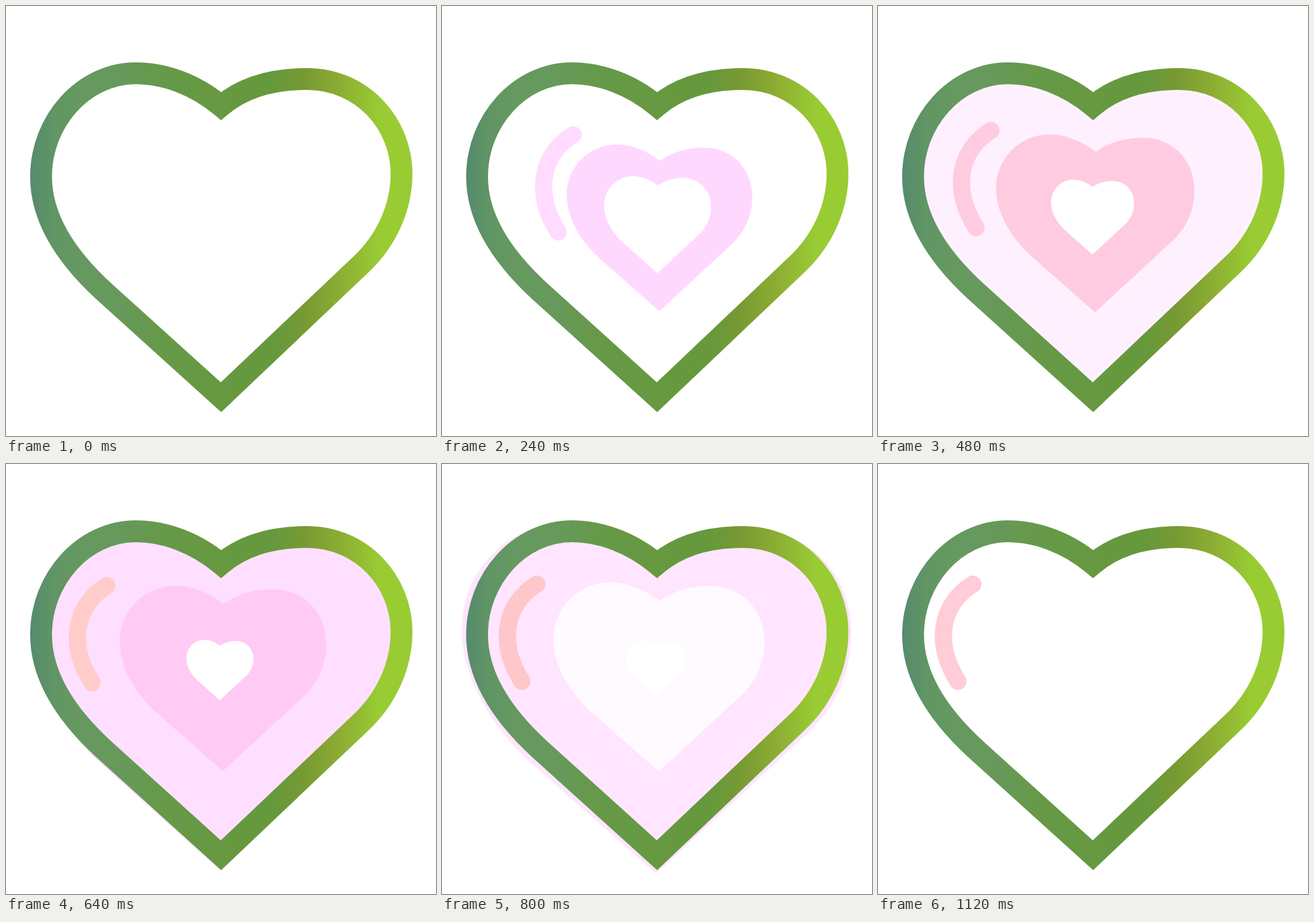
These frames come from a looping animation (748x748 px, 1200 ms). An HTML page:

```html
<!DOCTYPE html>
<html lang="en">
<head>
<meta charset="utf-8">
<title>Heart ripple</title>
<style>
html, body { margin: 0; width: 100%; height: 100%; overflow: hidden; background: #fff; }
svg { display: block; width: 100vw; height: 100vh; }

/* The picture advances every 80 ms: 15 poses per loop. */
.outer, .middle, .hole, .shine { animation: 1200ms linear infinite; }
.outer { animation-name: outer-grow, outer-tint; }
.middle { animation-name: middle-grow, middle-tint; }
.hole { animation-name: hole-shrink; fill: #fff; }
.shine { animation-name: shine-slide, shine-tint; fill: none; stroke-width: 30; stroke-linecap: round; }

@keyframes outer-grow {
  0% { transform: translate(100px, 160px) scale(1.471, 1.587); animation-timing-function: steps(11); }
  73.333%, 100% { transform: translate(28px, 97px) scale(1.883, 1.88); }
}
@keyframes outer-tint {
  0% { fill: #fff; }
  26.666% { fill: #fff; animation-timing-function: steps(2); }
  40% { fill: #fff0ff; animation-timing-function: steps(2); }
  53.333% { fill: #ffdfff; animation-timing-function: steps(1); }
  60% { fill: #ffd1ff; animation-timing-function: steps(2); }
  73.333% { fill: #fff8ff; animation-timing-function: steps(1); }
  80%, 100% { fill: #fff; }
}

@keyframes middle-grow {
  0% { transform: translate(228.5px, 258.5px) scale(.8195, .822); animation-timing-function: steps(9); }
  60%, 100% { transform: translate(194px, 206px) scale(1, 1); }
}
@keyframes middle-tint {
  0% { fill: #fff; animation-timing-function: steps(3); }
  20% { fill: #ffd8ff; animation-timing-function: steps(3); }
  40% { fill: #ffcbe0; animation-timing-function: steps(2); }
  53.333% { fill: #ffcbf4; animation-timing-function: steps(1); }
  60% { fill: #ffe8ff; animation-timing-function: steps(1); }
  66.666% { fill: #fffaff; animation-timing-function: steps(1); }
  73.333%, 100% { fill: #fff; }
}

@keyframes hole-shrink {
  0% { transform: translate(263px, 290px) scale(.62, .631); animation-timing-function: steps(9); }
  60%, 100% { transform: translate(320px, 308px) scale(.2807, .2796); }
}

@keyframes shine-slide {
  0% { transform: translate(94.5px, 22.5px); animation-timing-function: steps(9); }
  60%, 100% { transform: translate(0, 0); }
}
@keyframes shine-tint {
  0% { stroke: #fff; animation-timing-function: steps(3); }
  20% { stroke: #ffdcff; animation-timing-function: steps(3); }
  40% { stroke: #ffcbdf; animation-timing-function: steps(2); }
  53.333% { stroke: #ffccc9; animation-timing-function: steps(1); }
  60% { stroke: #ffc2c8; animation-timing-function: steps(2); }
  73.333% { stroke: #ffcbcb; animation-timing-function: steps(3); }
  93.333%, 100% { stroke: #ffccd7; }
}
</style>
</head>
<body>
<svg viewBox="0 0 748 748">
  <defs>
    <path id="heart" d="M184 32C159 13 130 0 99 0 44 0 0 44 0 100 0 144 26 189 64 224L183 329 326 197C353 172 367 139 367 103 367 49 328 6 271 6 238 6 208 15 184 32Z"/>
    <linearGradient id="leaf" gradientUnits="userSpaceOnUse" x1="42" y1="0" x2="707" y2="0">
      <stop offset="0" stop-color="#568b6d"/>
      <stop offset=".06" stop-color="#609565"/>
      <stop offset=".13" stop-color="#669960"/>
      <stop offset=".24" stop-color="#66995a"/>
      <stop offset=".35" stop-color="#669948"/>
      <stop offset=".5" stop-color="#669940"/>
      <stop offset=".64" stop-color="#66993c"/>
      <stop offset=".715" stop-color="#779933"/>
      <stop offset=".81" stop-color="#8cad33"/>
      <stop offset=".915" stop-color="#99cc33"/>
    </linearGradient>
  </defs>
  <use class="outer" href="#heart"/>
  <path fill="none" stroke="url(#leaf)" stroke-width="38" stroke-miterlimit="10" d="M374 174C330 137 276 117 226 117 135 117 61 200 61 297 61 370 105 437 172 498L374 680.5 617 450C662 408 688 350 688 292 688 205 620 127 523 127 465 127 413 141 374 174Z"/>
  <use class="middle" href="#heart"/>
  <use class="hole" href="#heart"/>
  <path class="shine" d="M165 209C110 243 96 310 139 378"/>
</svg>
</body>
</html>
```
